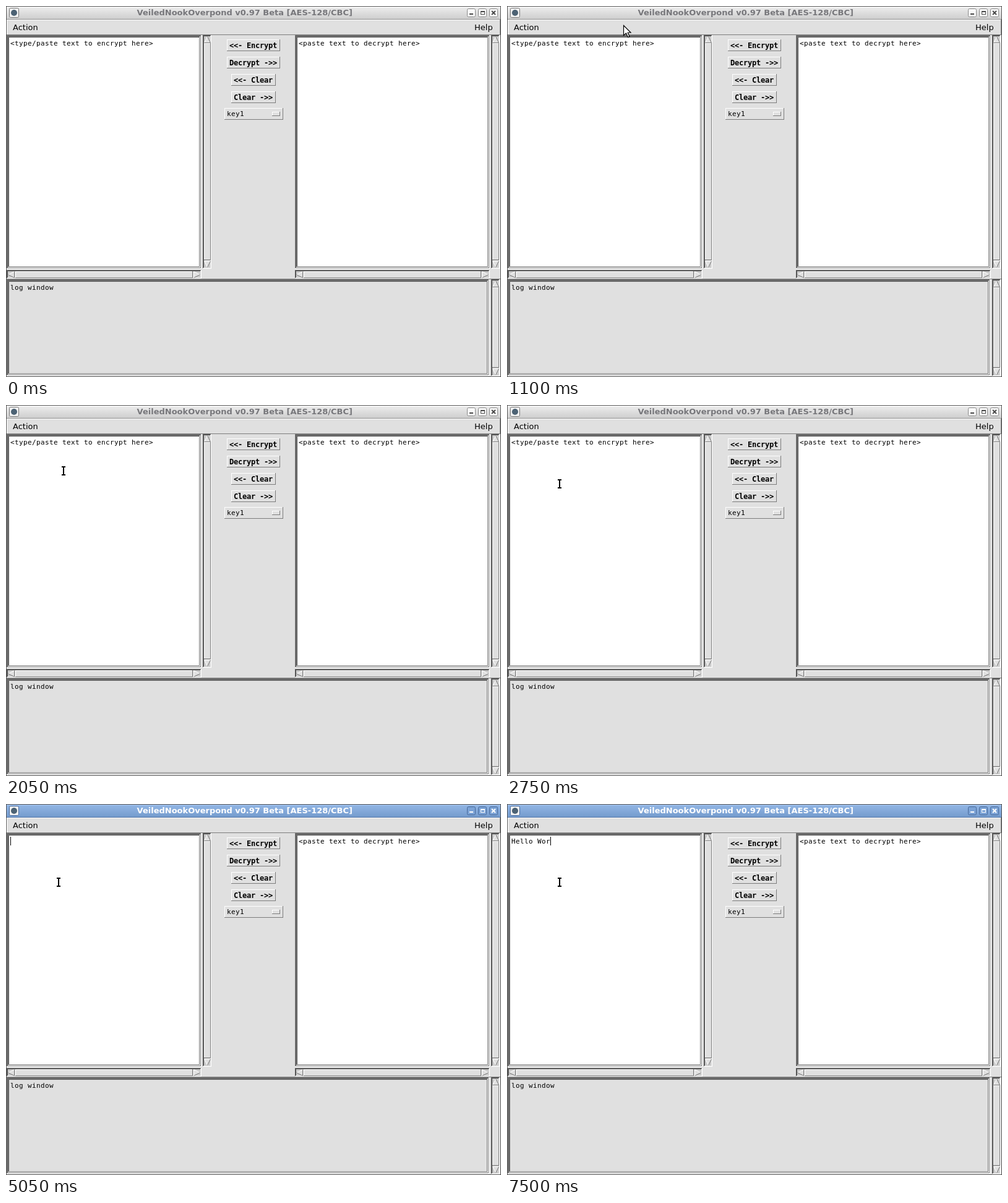
An HTML page with a canvas that plays this animation: 800x600 px, repeating every 8 s.

```html
<!DOCTYPE html>
<html lang="en">
<head>
<meta charset="utf-8">
<title>Encrypted chat window</title>
<style>
html, body { margin: 0; width: 100%; height: 100%; overflow: hidden; background: #e0e0e0; }
canvas { display: block; }
</style>
</head>
<body>
<canvas id="stage" width="800" height="600"></canvas>
<script>
const ctx = document.getElementById('stage').getContext('2d');
const LOOP = 8000;
const FACE = '#e0e0e0', DARK = '#555', MID = '#7c7c7c', TROUGH = '#cbcbcb', LIGHT = '#fff';
const MONO = '"DejaVu Sans Mono", monospace';
const SANS = '"DejaVu Sans", sans-serif';
const CELL = 7;
const HINT = '<type/paste text to encrypt here>';

// [time, typed text, caret visible]
const typing = [
  [0, HINT, false], [4600, HINT, true], [4850, '', true], [5300, '', false], [5800, '', true],
  [6050, 'He', true], [6500, 'Hell', true], [6750, 'Hello', true], [7000, 'Hello ', true],
  [7500, 'Hello Wor', true]
];

// [time, x, y] of the pointer once it rests in the text pane
const stops = [
  [1300, 158, 64], [1900, 98, 103], [2050, 93, 106], [2300, 86, 115],
  [2550, 85, 121], [2750, 85, 127], [5050, 85, 126]
];

const latest = (list, t) => list.filter(e => e[0] <= t).pop();

function box(x, y, w, h, color) {
  ctx.fillStyle = color;
  ctx.fillRect(x, y, w, h);
}

function bevel(x, y, w, h, topLeft, bottomRight) {
  box(x, y, w, 1, topLeft);
  box(x, y, 1, h, topLeft);
  box(x, y + h - 1, w, 1, bottomRight);
  box(x + w - 1, y, 1, h, bottomRight);
}

function raised(x, y, w, h) {
  box(x, y, w, h, FACE);
  bevel(x, y, w, h, LIGHT, MID);
}

function poly(points, fill) {
  ctx.beginPath();
  points.forEach(([x, y]) => ctx.lineTo(x, y));
  ctx.closePath();
  ctx.fillStyle = fill;
  ctx.fill();
}

function edge(a, b, color) {
  ctx.beginPath();
  ctx.moveTo(...a);
  ctx.lineTo(...b);
  ctx.strokeStyle = color;
  ctx.lineWidth = 1;
  ctx.stroke();
}

function label(str, x, y, font, color = '#000', align = 'left') {
  ctx.font = font;
  ctx.textAlign = align;
  ctx.fillStyle = color;
  ctx.fillText(str, x, y);
}

function mono(str, x, y, bold) {
  const size = bold ? 12 : 11;
  ctx.font = `${bold ? 'bold ' : ''}${size}px ${MONO}`;
  ctx.letterSpacing = CELL - ctx.measureText('0').width + 'px';
  label(str, x, y, ctx.font);
  ctx.letterSpacing = '0px';
}

function arrow(a, b, c, shades) {
  poly([a, b, c], FACE);
  edge(a, b, shades[0]);
  edge(b, c, shades[1]);
  edge(c, a, shades[2]);
}

function vbar(x, y, h) {
  const b = y + h;
  box(x, y, 14, h, TROUGH);
  bevel(x, y, 14, h, DARK, LIGHT);
  bevel(x + 1, y + 1, 12, h - 2, DARK, FACE);
  arrow([x + 7.5, y + 2.5], [x + 2.5, y + 12.5], [x + 12.5, y + 12.5], [LIGHT, MID, MID]);
  raised(x + 2, y + 13, 11, h - 27);
  arrow([x + 7.5, b - 2.5], [x + 2.5, b - 12.5], [x + 12.5, b - 12.5], [LIGHT, LIGHT, MID]);
}

function hbar(x, y, w) {
  const r = x + w;
  box(x, y, w, 14, TROUGH);
  bevel(x, y, w, 14, DARK, LIGHT);
  bevel(x + 1, y + 1, w - 2, 12, DARK, FACE);
  arrow([x + 2.5, y + 7.5], [x + 12.5, y + 2.5], [x + 12.5, y + 12.5], [LIGHT, MID, MID]);
  raised(x + 14, y + 2, w - 28, 11);
  arrow([r - 2.5, y + 7.5], [r - 12.5, y + 2.5], [r - 12.5, y + 12.5], [LIGHT, LIGHT, MID]);
}

function pane(x, y, w, h, fill) {
  box(x, y, w, h, fill);
  bevel(x, y, w, h, MID, LIGHT);
  bevel(x + 1, y + 1, w - 2, h - 2, DARK, MID);
  bevel(x + 2, y + 2, w - 4, h - 4, MID, LIGHT);
  bevel(x + 3, y + 3, w - 6, h - 6, DARK, MID);
}

function button(str, x, y, w) {
  raised(x, y, w, 19);
  mono(str, x + 4, y + 14, true);
}

function titleButton(x, active) {
  ctx.beginPath();
  ctx.roundRect(x + .5, 4.5, 13, 13, 2);
  ctx.fillStyle = active ? '#7ca3d6' : '#fafafa';
  ctx.fill();
  ctx.strokeStyle = active ? '#47699a' : '#8a8a8a';
  ctx.lineWidth = 1;
  ctx.stroke();
}

function titleBar(active) {
  const g = ctx.createLinearGradient(0, 1, 0, 21);
  g.addColorStop(0, active ? '#93b7e6' : '#eeeeee');
  g.addColorStop(1, active ? '#749bcd' : '#cecece');
  box(1, 1, 798, 20, g);
  box(1, 1, 798, 1, active ? '#a9c6ec' : '#f8f8f8');
  box(1, 21, 798, 1, active ? '#4f72a3' : '#8f8f8f');

  ctx.beginPath();
  ctx.roundRect(5.5, 3.5, 15, 15, 2);
  ctx.fillStyle = '#f2f2f2';
  ctx.fill();
  ctx.strokeStyle = active ? '#47699a' : '#777';
  ctx.lineWidth = 1;
  ctx.stroke();
  ctx.beginPath();
  ctx.arc(13, 11, 5, 0, 7);
  ctx.fillStyle = '#4c6274';
  ctx.fill();

  label('VeiledNookOverpond v0.97 Beta [AES-128/CBC]', 560, 15, 'bold 13px ' + SANS,
    active ? '#fff' : '#77777b', 'right');

  const ink = active ? '#fff' : '#4a4a4a';
  [745, 763, 781].forEach(x => titleButton(x, active));
  box(749, 12, 6, 2, ink);
  bevel(767, 8, 7, 6, ink, ink);
  box(767, 8, 7, 2, ink);
  ctx.strokeStyle = ink;
  ctx.lineWidth = 2;
  ctx.beginPath();
  ctx.moveTo(785, 8); ctx.lineTo(791, 14);
  ctx.moveTo(791, 8); ctx.lineTo(785, 14);
  ctx.stroke();
}

function windowBody() {
  raised(1, 22, 798, 25);
  label('Action', 11, 39, '13px ' + SANS);
  label('Help', 757, 39, '13px ' + SANS);

  pane(1, 47, 315, 378, LIGHT);
  vbar(318, 47, 378);
  hbar(1, 427, 315);
  pane(467, 47, 315, 378, LIGHT);
  vbar(784, 47, 378);
  hbar(467, 427, 315);
  box(1, 441, 798, 1, MID);
  pane(1, 442, 780, 156, FACE);
  vbar(784, 442, 157);

  button('<<- Encrypt', 357, 54, 86);
  button('Decrypt ->>', 357, 82, 86);
  button('<<- Clear', 364, 110, 72);
  button('Clear ->>', 364, 138, 72);
  raised(353, 165, 95, 19);
  raised(430, 171, 13, 7);
  mono('key1', 357, 178);

  mono('<paste text to decrypt here>', 473, 64);
  mono('log window', 7, 459);
}

function arrowPointer(x, y) {
  const tip = [[0, 0], [0, 16], [4, 12.5], [7, 19], [9.5, 18], [6.7, 11.5], [11.5, 11.5]];
  const shape = tip.map(([dx, dy]) => [x + dx + .5, y + dy + .5]);
  poly(shape, '#fff');
  ctx.strokeStyle = '#000';
  ctx.lineWidth = 1.2;
  ctx.stroke();
}

function beamPointer(x, y) {
  const l = x - 4, t = y - 8;
  box(l, t, 8, 4, '#fff');
  box(l, t + 13, 8, 4, '#fff');
  box(l + 2, t + 2, 4, 13, '#fff');
  box(l + 1, t + 1, 6, 2, '#000');
  box(l + 1, t + 14, 6, 2, '#000');
  box(l + 3, t + 2, 2, 13, '#000');
}

function pointer(t) {
  if (t < 900) return;
  if (t >= 1300) return beamPointer(...latest(stops, t).slice(1));
  const k = Math.floor((t - 900) / 50) / 8;
  const x = Math.round(217 - 59 * k), y = Math.round(-2 + 66 * k);
  (y < 50 ? arrowPointer : beamPointer)(x, y);
}

function draw(t) {
  const [, text, caret] = latest(typing, t);
  box(0, 0, 800, 600, FACE);
  titleBar(t >= 4600);
  windowBody();
  mono(text, 7, 64);
  if (caret) box(7 + CELL * text.length, 53, 1, 14, '#000');
  bevel(0, 0, 800, 600, '#5a5a5a', '#5a5a5a');
  pointer(t);
}

function tick(now) {
  draw(now % LOOP);
  requestAnimationFrame(tick);
}
draw(0);
requestAnimationFrame(tick);
</script>
</body>
</html>
```
